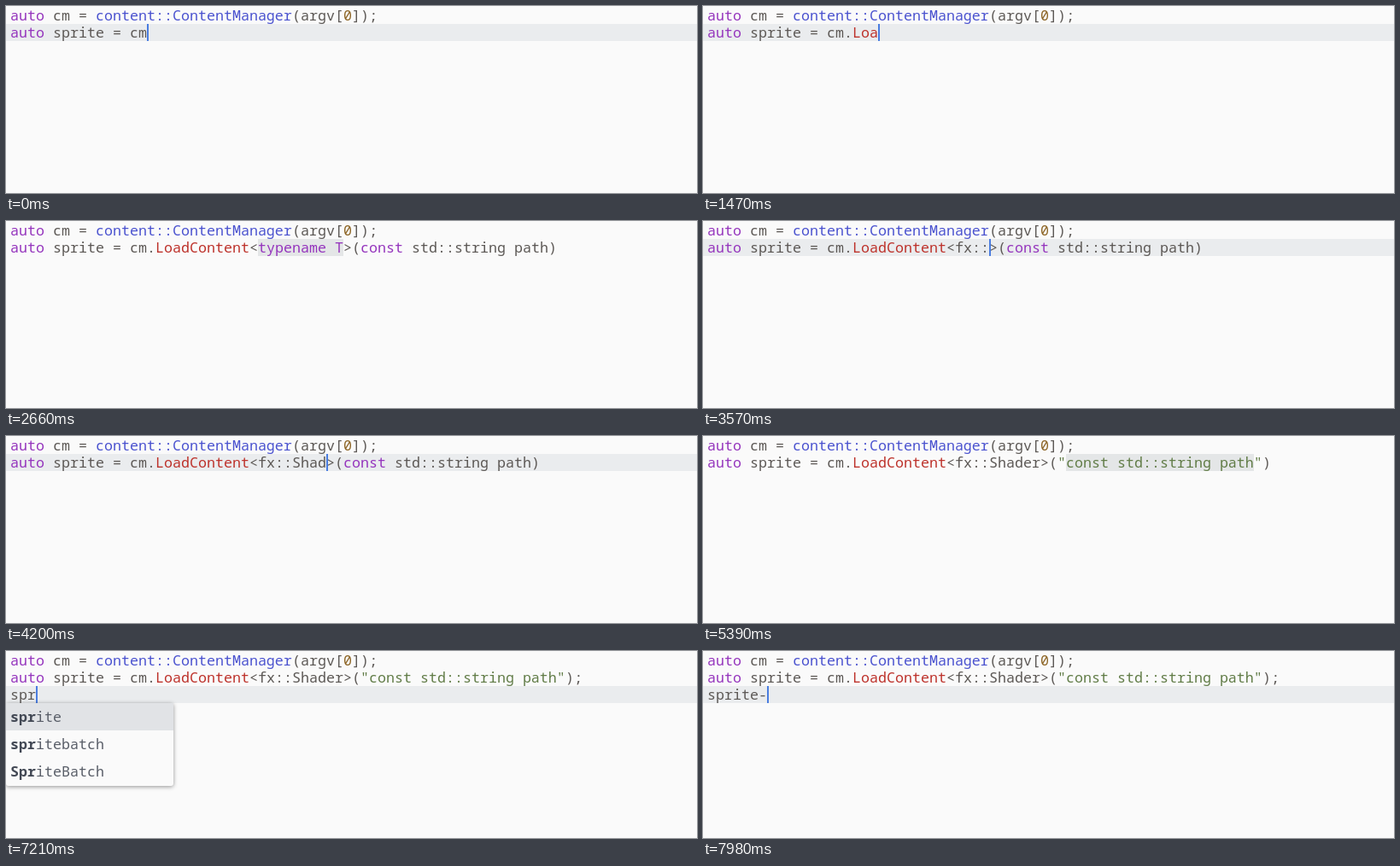
An HTML page for the animation above (8 s loop, 809x219 px).

```html
<!DOCTYPE html>
<html lang="en">
<head>
<meta charset="utf-8">
<title>Code completion</title>
<style>
  html, body { margin: 0; width: 100%; height: 100%; overflow: hidden; background: #fafafa; }
  svg { display: block; }
  text { font: 16.667px "Noto Sans Mono", "DejaVu Sans Mono", monospace; white-space: pre; }
  .n { fill: #5c5855; }
  .k { fill: #9535bd; }
  .f { fill: #4a52cf; }
  .r { fill: #bd322b; }
  .d { fill: #8c6424; }
  .s { fill: #617c47; }
  .b { fill: #434955; font-weight: 700; }
  .p { fill: #595e68; }
  .g { fill: #a0a1a4; }
  .m { fill: #62abe8; font: 700 12px "Noto Sans Mono", monospace; }
  .pop { filter: drop-shadow(0 1px 2.5px rgba(0, 0, 0, .42)); }
</style>
</head>
<body>
<svg id="stage" width="809" height="219" viewBox="0 0 809 219"></svg>
<script>
const LOOP = 8000, CELL = 10, LEFT = 5, ROW = 32;
const stage = document.getElementById('stage');
const esc = s => s.replace(/&/g, '&amp;').replace(/</g, '&lt;').replace(/>/g, '&gt;');

const rect = (x, y, w, h, fill, extra = '') =>
  `<rect x="${x}" y="${y}" width="${w}" height="${h}" fill="${fill}" ${extra}/>`;

// Tokens are [class, text] pairs laid out on a fixed character grid.
function line(x, y, tokens) {
  let col = 0;
  return tokens.map(([cls, s]) => {
    const out = `<text class="${cls}" x="${x + col * CELL}" y="${y}">${esc(s)}</text>`;
    col += s.length;
    return out;
  }).join('');
}

const FIRST = [['k', 'auto'], ['n', ' cm = '], ['f', 'content::ContentManager'],
  ['n', '(argv['], ['d', '0'], ['n', ']);']];
const HEAD = [['k', 'auto'], ['n', ' sprite = cm']];
const PLAIN = [['k', 'const'], ['n', ' std::string path']];
const QUOTED = [['s', '"const std::string path"']];

const call = (type, arg, end = ')') => [['n', '.'], ['r', 'LoadContent'], ['n', '<'],
  [type === 'typename T' ? 'k' : 'n', type], ['n', '>('], ...arg, ['n', end]];
const member = s => [['n', '.'], ['r', s]];

const overload = (args, close = '') => [['b', 'Load'], ['p', 'Content<'], ['g', 'typename T'],
  ['p', '>('], ['g', args], ['p', close]];
const METHODS = [
  overload('const std::string referencePath, c…'),
  overload('const std::string path', ')'),
  overload('const content::LoadOperation &oper…'),
  [['b', 'Load'], ['p', 'Content']]
];
const words = (n, list) => list.map(w => [['b', w.slice(0, n)], ['p', w.slice(n)]]);
const SPRITES = ['sprite', 'spritebatch', 'SpriteBatch'];

const methods = (pick, alpha = 1) =>
  ({ x: 131, y: 41, w: 655, pad: 44, icons: 3, rows: METHODS, pick, alpha });
const names = (n, list, alpha = 1) =>
  ({ x: 0, y: 61, w: 196, pad: 5, icons: 0, rows: words(n, list), pick: 0, alpha });

function popup({ x, y, w, pad, icons, rows, pick, alpha }) {
  const h = rows.length * ROW + 1;
  let out = rect(x, y, w, h, '#fafafa', 'rx="3" class="pop"');
  out += rect(x, y + pick * ROW, w, ROW, '#e1e3e6');
  for (let i = 0; i < icons; i++) {
    out += rect(x, y + i * ROW, 32, ROW, i === pick ? '#d3e5f4' : '#daebf9');
    out += `<text class="m" x="${x + 16}" y="${y + i * ROW + 21}" text-anchor="middle">m</text>`;
  }
  rows.forEach((row, i) => { out += line(x + pad, y + i * ROW + 22, row); });
  return `<g opacity="${alpha}">${out}</g>`;
}

// Each step overrides part of the editor state; caret and sel are columns.
const steps = [];
const at = (time, change) => steps.push([time, change]);

at(0, { tail: [], third: '', row: 1, caret: 16, sel: null, pop: null });
at(350, { tail: member(''), caret: 17 });
at(770, { caret: null });
[1120, 1330, 1470, 1680].forEach((t, i) =>
  at(t, { tail: member('Load'.slice(0, i + 1)), caret: 18 + i }));
at(2030, { caret: null, pop: methods(0, .7) });
at(2100, { pop: methods(0) });
at(2380, { pop: methods(1) });
at(2590, { pop: null, row: null, tail: call('typename T', PLAIN), sel: [29, 10] });

const typed = ['f', 'fx', 'fx::', 'fx::S', 'fx::Sh', 'fx::Sha', 'fx::Shad', 'fx::Shade', 'fx::Shader'];
[3150, 3360, 3570, 3710, 3920, 4060, 4200, 4340, 4480].forEach((t, i) =>
  at(t, { tail: call(typed[i], PLAIN), row: 1, sel: null, caret: 29 + typed[i].length }));

at(4620, { row: null, caret: null, sel: [41, 22] });
at(5390, { tail: call('fx::Shader', QUOTED), sel: [42, 22] });
at(5740, { row: 1, sel: null, caret: 66 });
at(6090, { tail: call('fx::Shader', QUOTED, ');'), caret: 67 });
at(6300, { row: 2, caret: 0 });
at(6720, { third: 's', caret: 1 });
at(6790, { pop: names(1, [...SPRITES, 'Shader', 'string']) });
at(6930, { third: 'sp', caret: 2 });
at(7000, { pop: names(2, SPRITES) });
at(7140, { third: 'spr', caret: 3 });
at(7210, { pop: names(3, SPRITES) });
at(7560, { third: 'sprite', caret: 6, pop: null });
at(7980, { third: 'sprite-', caret: 7 });

function draw(s) {
  const top = 21 + ((s.row || 1) - 1) * 20;
  let out = '';
  if (s.row) out += rect(0, top, 809, 20, '#eaecee');
  if (s.sel) out += rect(LEFT + s.sel[0] * CELL, 21, s.sel[1] * CELL, 20, '#e4e6e7');
  out += line(LEFT, 17, FIRST) + line(LEFT, 37, [...HEAD, ...s.tail]);
  out += line(LEFT, 57, [['n', s.third]]);
  if (s.caret !== null) out += rect(LEFT + s.caret * CELL, top, 2, 20, '#4a7de0');
  if (s.pop) out += popup(s.pop);
  stage.innerHTML = out;
}

let shown = -1;
function tick(now) {
  const t = now % LOOP;
  const count = steps.filter(([time]) => time <= t).length;
  if (count !== shown) {
    shown = count;
    draw(Object.assign({}, ...steps.slice(0, count).map(step => step[1])));
  }
  requestAnimationFrame(tick);
}
const start = performance.now();
const run = now => { tick(Math.max(0, now - start)); };
const raf = window.requestAnimationFrame.bind(window);
window.requestAnimationFrame = fn => raf(now => fn(Math.max(0, now - start)));
run(start);
</script>
</body>
</html>
```
